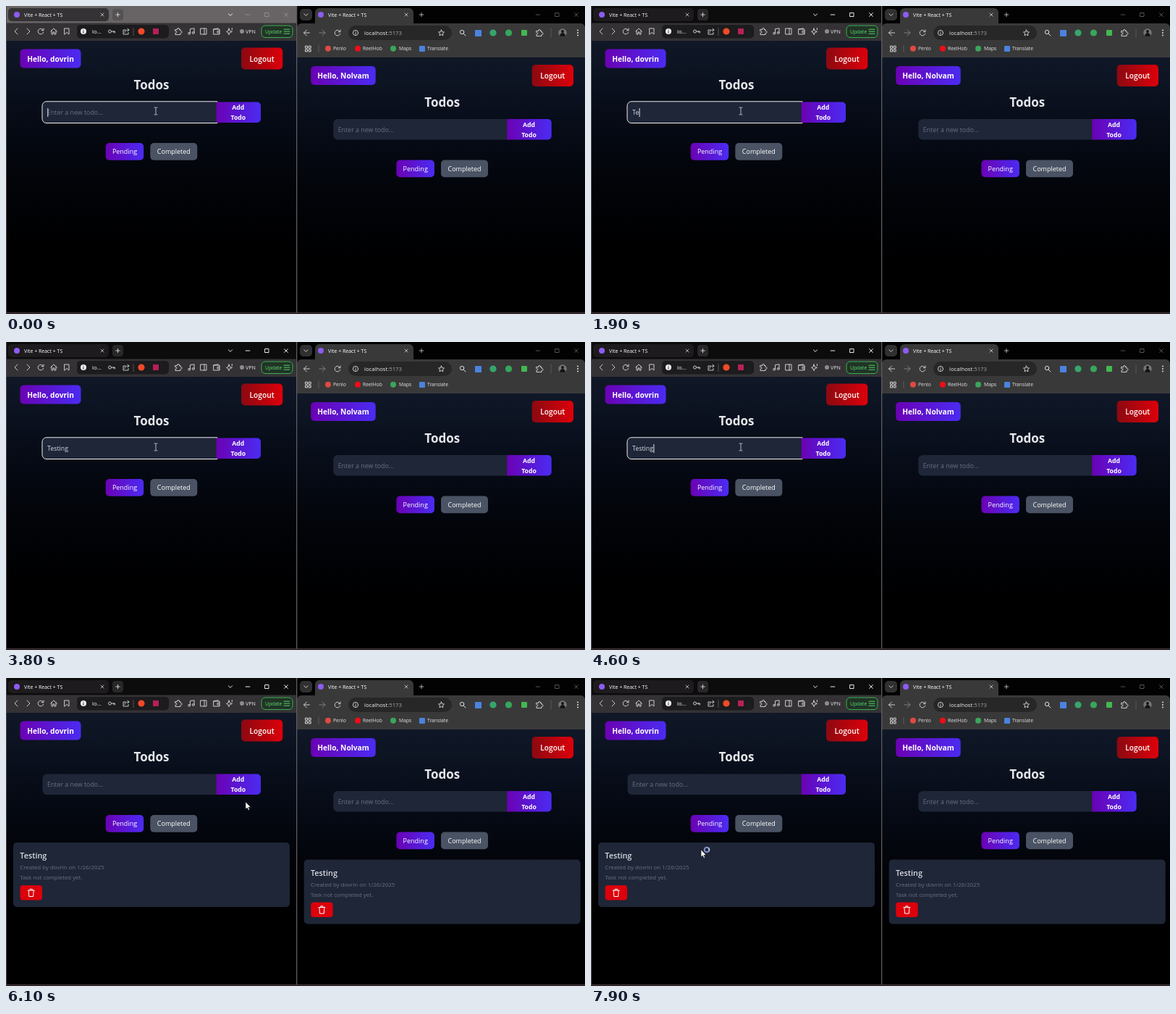
An HTML page with a canvas for the animation above (8000 ms loop, 800 px wide and 425 px high).

```html
<!DOCTYPE html>
<html lang="en">
<head>
<meta charset="utf-8">
<title>Shared todo list</title>
<style>
html, body { margin: 0; width: 800px; height: 425px; overflow: hidden; background: #000; }
canvas { display: block; }
</style>
</head>
<body>
<canvas id="stage" width="800" height="425"></canvas>
<script>
const LOOP = 8000, STEP = 100;
const ctx = document.getElementById('stage').getContext('2d');

// Drawing helpers
function box(x, y, w, h, fill, radius = 0, line) {
  ctx.beginPath();
  ctx.roundRect(x, y, w, h, radius);
  if (fill) { ctx.fillStyle = fill; ctx.fill(); }
  if (line) { ctx.strokeStyle = line; ctx.lineWidth = 1; ctx.stroke(); }
}

function dot(x, y, r, fill) {
  ctx.beginPath();
  ctx.arc(x, y, r, 0, 7);
  ctx.fillStyle = fill;
  ctx.fill();
}

function text(str, x, y, size, color = '#fff', weight = 400, align = 'left') {
  ctx.font = `${weight} ${size}px "Open Sans", "Noto Sans", sans-serif`;
  ctx.textAlign = align;
  ctx.fillStyle = color;
  ctx.fillText(str, x, y);
  return ctx.measureText(str).width;
}

function shape(d, x, y, line, fill, width = 1) {
  const path = new Path2D(d);
  ctx.save();
  ctx.translate(x, y);
  ctx.lineWidth = width;
  ctx.lineJoin = ctx.lineCap = 'round';
  if (fill) { ctx.fillStyle = fill; ctx.fill(path); }
  if (line) { ctx.strokeStyle = line; ctx.stroke(path); }
  ctx.restore();
}

function blend(x0, y0, x1, y1, ...colors) {
  const g = ctx.createLinearGradient(x0, y0, x1, y1);
  colors.forEach((c, i) => g.addColorStop(i / (colors.length - 1), c));
  return g;
}

const across = (x, w, a, b) => blend(x, 0, x + w, 0, a, b);
const violet = (x, w) => across(x, w, '#6a02b4', '#4b2bf2');

// Icons are centred on 0,0
const ICON = {
  back: 'M4 0H-4M0-4L-4 0L0 4',
  forward: 'M-4 0H4M0-4L4 0L0 4',
  left: 'M2-4L-2 0L2 4',
  right: 'M-2-4L2 0L-2 4',
  reload: 'M3.5-1.5A3.8 3.8 0 1 0 3.7 1.2M4-4V-1.3H1.3',
  home: 'M-4.3 0L0-4L4.3 0M-3-1V4H-1V1H1V4H3V-1',
  bookmark: 'M-3-4H3V4L0 1.5L-3 4Z',
  info: 'M3.6 0A3.6 3.6 0 1 0-3.6 0A3.6 3.6 0 1 0 3.6 0M0-.3V2M0-2V-1.9',
  key: 'M-.5 0A2 2 0 1 0-4.5 0A2 2 0 1 0-.5 0H4.5V2M2.5 0V1.5',
  share: 'M-1-2H-4V4H3V1.5M-2 1.5C-2-1 0-2 4-2M2-4L4-2L2 0',
  puzzle: 'M-4-2.5H-1.3A1.4 1.4 0 1 1 1.3-2.5H3V-.3A1.4 1.4 0 1 1 3 2.2V4.5H-4V2A1.4 1.4 0 1 0-4-.5Z',
  music: 'M-1.5 2.8V-3.4L4-4.2V2M-1.5 2.8A1.4 1.4 0 1 1-4.3 2.8A1.4 1.4 0 1 1-1.5 2.8M4 2A1.4 1.4 0 1 1 1.2 2A1.4 1.4 0 1 1 4 2',
  panel: 'M-4-4H4V4H-4ZM1-4V4',
  wallet: 'M-4-3H4V4H-4ZM4-.5H1V2H4M-4-3L2-4.2V-3',
  spark: 'M-1-4L.2-.8L3.5 .5L.2 1.6L-1 4.6L-2.1 1.6L-4.5 .5L-2.1-.8ZM3.3-4.5V-2',
  down: 'M-2.6-1.2L0 1.4L2.6-1.2',
  close: 'M-2.4-2.4L2.4 2.4M2.4-2.4L-2.4 2.4',
  plus: 'M-2.7 0H2.7M0-2.7V2.7',
  min: 'M-2.8 0H2.8',
  max: 'M-2.5-2.5H2.5V2.5H-2.5Z',
  star: 'M0-4L1.2-1.3L4-1L1.9 .9L2.5 3.8L0 2.3L-2.5 3.8L-1.9 .9L-4-1L-1.2-1.3Z',
  lens: 'M1.8-1A2.7 2.7 0 1 0-3.6-1A2.7 2.7 0 1 0 1.8-1M1.2 1.2L4 4',
  menu: 'M-4-3H4M-4 0H4M-4 3H4',
  trash: 'M-4.5-3.2H4.5M-1.6-3.4V-5H1.6V-3.4M-3.5-3L-2.9 5.2H2.9L3.5-3'
};

const icon = (name, x, y, color = '#dcdcdc', scale = 1, width = .9) => {
  ctx.save();
  ctx.translate(x, y);
  ctx.scale(scale, scale);
  shape(ICON[name], 0, 0, color, null, width);
  ctx.restore();
};

function controls(x, color) {
  ['min', 'max', 'close'].forEach((name, i) => icon(name, x + i * 26.5, 12, color));
}

function leftChrome(active) {
  box(0, 0, 401, 48, active ? '#0d0c0d' : '#686465');
  box(3, 3, 139, 18, active ? '#1d1b1d' : '#343234', 5);
  dot(15, 12, 4, '#8d5cf0');
  text('Vite + React + TS', 25, 14.6, 7);
  icon('close', 133, 12, '#ddd', .85);
  box(147, 4, 15, 16, active ? '#292729' : '#555253', 4);
  icon('plus', 154.5, 12);
  icon('down', 310, 12, '#fff');
  controls(334, active ? '#fff' : '#969292');

  box(0, 23.5, 401, 24.5, '#343235');
  [['left', 14], ['right', 31], ['reload', 48], ['home', 66], ['bookmark', 84]]
    .forEach(([name, x]) => icon(name, x, 35));
  box(98, 26, 127, 18.5, '#1c1b1d', 5);
  dot(107, 35, 4, '#eee');
  box(106.5, 34.5, 1, 3, '#222');
  box(106.5, 32.5, 1, 1, '#222');
  text('lo...', 119, 38, 7.7);
  icon('key', 146, 35);
  icon('share', 166, 35);
  box(175.5, 30, 1, 11, '#555');
  dot(187, 35, 4.6, '#f04a28');
  box(203, 31, 8, 8, '#b52055');
  [['puzzle', 238], ['music', 256], ['panel', 273], ['wallet', 291], ['spark', 309]]
    .forEach(([name, x]) => icon(name, x, 35));
  dot(326, 35, 3, '#8d8b90');
  text('VPN', 331, 38, 7.1, '#e8e8e8');
  box(353, 27, 43, 16.5, '#203426', 5, '#3eae51');
  text('Update', 358, 37.8, 6.8, '#5fdb70');
  icon('menu', 388, 35.2, '#5fdb70');
}

function rightChrome() {
  box(402, 0, 398, 71, '#020202');
  box(406, 4, 17, 16, '#303030', 5);
  icon('down', 414.5, 12);
  box(402, 24, 398, 47, '#3a393a', [6, 6, 0, 0]);
  box(427, 3, 136, 22, '#3a393a', [6, 6, 0, 0]);
  dot(435, 12, 4, '#8d5cf0');
  text('Vite + React + TS', 445, 14.6, 7);
  icon('close', 553, 12, '#ddd', .85);
  icon('plus', 574, 12, '#bbb');
  controls(735, '#5c5c5c');

  icon('back', 415.5, 37);
  icon('forward', 437, 37, '#858585');
  icon('reload', 458, 37);
  box(473, 27, 143, 20, '#272727', 10);
  icon('info', 483, 37);
  const w = text('localhost', 495, 40, 7.7, '#eee');
  text(':5173', 495 + w, 40, 7.7, '#a5a5a5');
  icon('star', 601.5, 37);
  icon('lens', 631, 37, '#eee');
  box(648, 33, 9, 9, '#4c82df', 1);
  dot(673, 37, 4.6, '#35a66e');
  dot(694.5, 37, 4.6, '#38a65a');
  box(712, 33, 8, 8, '#42b94e', 1);
  icon('puzzle', 737, 37);
  box(752.5, 31, 1, 12, '#585858');
  dot(769, 37, 5.7, '#77777b');
  dot(769, 35, 2, '#161417');
  shape('M-4 4Q-3 0 0 0T4 4Q0 7-4 4', 769, 37, null, '#161417');
  [-3.5, 0, 3.5].forEach(dy => dot(790, 37 + dy, 1, '#ddd'));

  for (let i = 0; i < 4; i++)
    box(413.5 + i % 2 * 4.7, 55.2 + (i >> 1) * 4.7, 3, 3, null, 0, '#d8d8d8');
  box(431.5, 54, 1, 10, '#5c5c5c');
  dot(445, 58.8, 4, '#df4b3f');
  dot(486, 58.8, 4, '#f20d16');
  dot(535, 58.8, 4, '#39a65a');
  box(571, 55, 8, 8, '#4c82df', 1);
  [['Penlo', 452], ['ReelHob', 493], ['Maps', 543], ['Translate', 582]]
    .forEach(([label, x]) => text(label, x, 61.4, 6.8, '#e4e4e4'));
}

function card() {
  box(10, 227, 382, 89, '#1e2637', 5);
  text('Testing', 19.3, 249, 10.8, '#d9dce2', 600);
  text('Created by dovrin on 1/26/2025', 19.3, 264, 7.9, '#6a7282');
  text('Task not completed yet.', 19.3, 278, 7.8, '#6a7282');
  box(19.5, 286, 30.5, 20.5, '#db000c', 4);
  icon('trash', 34.7, 296.3, '#fff', 1, 1);
}

function page(dx, dy, user, badgeWidth, { typed = '', focus, caret, saved }) {
  ctx.save();
  ctx.translate(dx, dy);
  box(0, 48, 402, 377, blend(0, 48, 0, 424, '#101828', '#070c18', '#020409', '#000001', '#000'));
  box(19.5, 59.5, badgeWidth, 26, violet(19.5, badgeWidth), 5);
  text('Hello, ' + user, 19.5 + badgeWidth / 2, 76.5, 10.2, '#fff', 700, 'center');
  box(325, 57.5, 57.3, 30, across(325, 57, '#8c0911', '#dc000a'), 5);
  text('Logout', 353.6, 76.5, 10.2, '#fff', 600, 'center');
  text('Todos', 201, 115, 17, '#e5e7eb', 700, 'center');

  box(50.5, 132.5, 241, 28.5, '#1e2638', [6, 0, 0, 6]);
  if (focus) box(50, 131.8, 242, 29.7, null, [6, 0, 0, 6], '#f4f5f7');
  const w = text(typed || 'Enter a new todo...', 57, 150, 8.85, typed ? '#d8dbe2' : '#697080');
  if (caret) box(57.3 + (typed && w), 141, 1, 12, '#e4e6ea');
  box(290.7, 132.5, 61.3, 28.5, violet(290.7, 61), [0, 5, 5, 0]);
  text('Add', 320.8, 143.2, 8.7, '#fff', 700, 'center');
  text('Todo', 320.8, 157.2, 8.7, '#fff', 700, 'center');

  box(137.7, 189, 52.5, 23.7, violet(137.7, 52), 5);
  text('Pending', 164, 204.2, 9, '#fff', 400, 'center');
  box(199.3, 189, 65, 23.7, '#4a5363', 5);
  text('Completed', 231.8, 204.2, 9, '#fff', 400, 'center');
  if (saved) card();
  ctx.restore();
}

// Pointer path: time, x, y
const PATH = [[0, 207, 145], [4700, 207, 145], [5200, 325, 147], [5700, 325, 147],
              [6000, 331, 171], [6500, 331, 171], [7600, 152, 237], [LOOP, 152, 237]];

function pointerAt(t) {
  const i = PATH.findIndex(p => p[0] > t);
  const [a, b] = [PATH[i - 1], PATH[i]];
  const k = (t - a[0]) / (b[0] - a[0]);
  const ease = k * k * (3 - 2 * k);
  return [1, 2].map(n => a[n] + (b[n] - a[n]) * ease);
}

function pointer(t) {
  const [x, y] = pointerAt(t);
  const overRow = y > 132 && y < 161;
  if (overRow && x < 291) {
    shape('M-2-5H-.6L0-4.4L.6-5H2M0-4.4V4.4M-2 5H-.6L0 4.4L.6 5H2', x, y, '#c9ccd2', null, .9);
  } else if (overRow && x < 352) {
    shape('M-1 0Q0-1.5 1 0V4Q2 3 3 4.3Q4 3.6 4.8 4.8Q6 4.4 6.2 6V9L5 12.5H-1L-4 8Q-4.2 6-2.6 6.6L-1 8Z',
      x - .5, y, '#111', '#fff', .7);
  } else {
    shape('M0 0V10L2.3 7.9L3.9 11.4L5.5 10.7L4 7.3H7Z', x, y, '#111', '#fff', .6);
    if (t >= 7500) {
      shape('M3.3 0A3.3 3.3 0 1 0-3.3 0A3.3 3.3 0 1 0 3.3 0', x + 8, y, '#8591c6', null, 2);
      ctx.beginPath();
      ctx.arc(x + 8, y, 3.3, t / 160, t / 160 + 1.5);
      ctx.strokeStyle = '#b9c3ec';
      ctx.lineWidth = 1.6;
      ctx.stroke();
    }
  }
}

const KEYS = [1000, 1600, 2000, 2400, 2800, 3000, 3200];
const CLICK = 5500, SAVED = 5800;

function draw(t) {
  const focus = t < CLICK;
  const count = KEYS.filter(k => k <= t).length;
  const lastKey = count ? KEYS[count - 1] : 0;
  const caret = focus && (t - lastKey) % 1000 < 500;
  const saved = t >= SAVED;

  page(0, 0, 'dovrin', 84, { typed: focus ? 'Testing'.slice(0, count) : '', focus, caret, saved });
  page(401.7, 23.5, 'Nolvam', 89.5, { saved });
  leftChrome(t >= STEP);
  rightChrome();
  box(0, 0, 1, 425, '#484548');
  box(401, 0, 1.3, 425, '#5e5b5d');
  box(0, 423, 800, 1, '#55454b');
  box(0, 424, 800, 1, '#1d1015');
  pointer(t);
}

const start = performance.now();
function tick() {
  const t = (performance.now() - start) % LOOP;
  draw(Math.floor(t / STEP) * STEP);
  requestAnimationFrame(tick);
}
tick();
</script>
</body>
</html>
```
